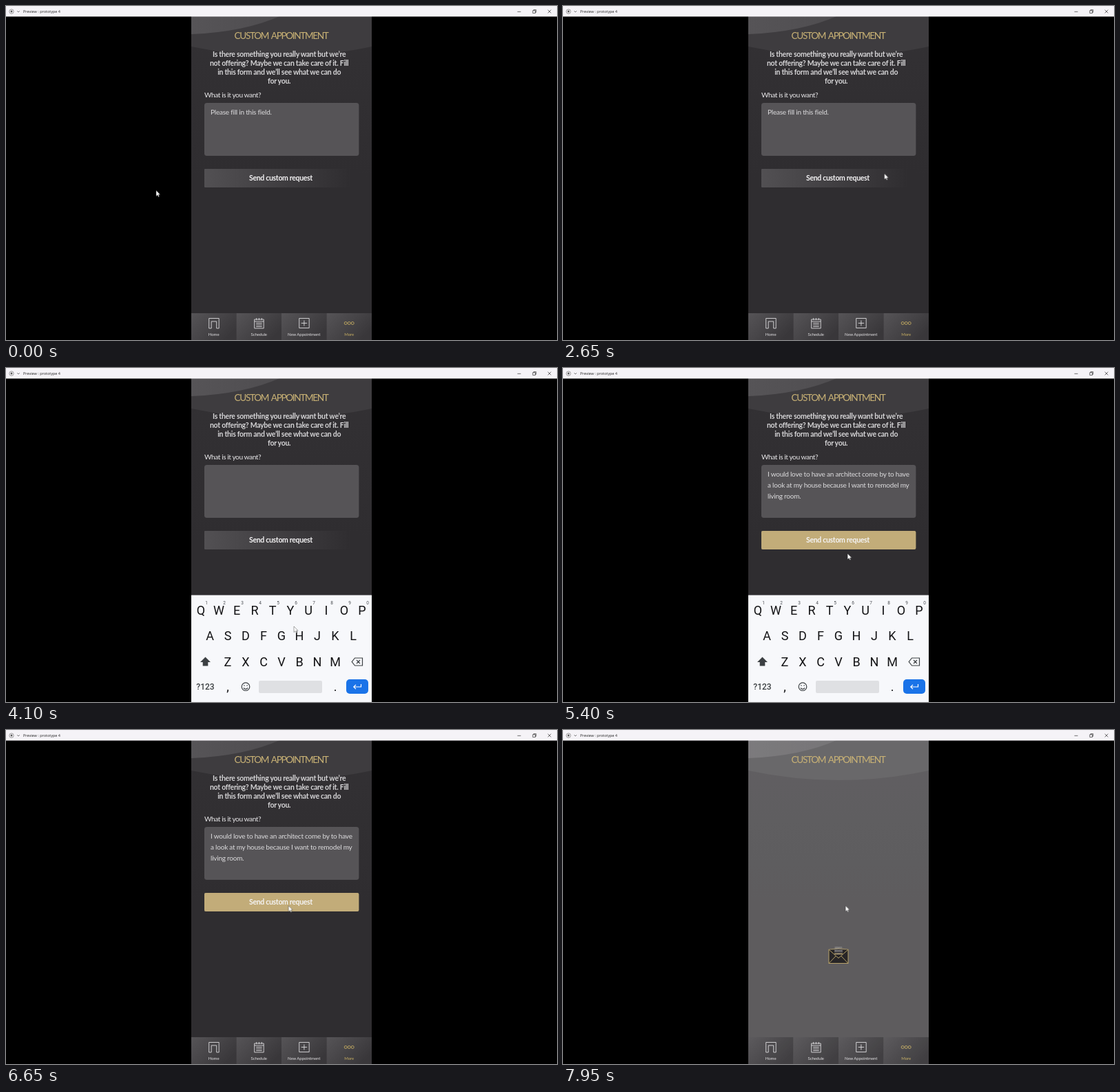
These frames come from a looping animation (800 px wide and 486 px high, 8000 ms). An HTML page:

```html
<!DOCTYPE html>
<html lang="en">
<head>
<meta charset="utf-8">
<title>Custom appointment</title>
<style>
  html, body { margin: 0; width: 100%; height: 100%; overflow: hidden; background: #000; }
  svg { display: block; width: 800px; height: 486px; }
  text { font-family: Lato, sans-serif; fill: #e9e8ea; white-space: pre; }
  .mid { text-anchor: middle; }
  .bar text { font: 5.5px "Open Sans", sans-serif; fill: #222; }
  .title { font-size: 13.6px; letter-spacing: -1.35px; word-spacing: 2.2px; fill: #c9b275; }
  .intro { font-size: 10.5px; font-weight: 700; letter-spacing: -.28px; fill: #d6d5d7; }
  .label { font-size: 10.2px; letter-spacing: -.45px; }
  .field { font-size: 10px; letter-spacing: -.22px; fill: #dddcde; }
  .send { font-size: 10.5px; font-weight: 700; letter-spacing: -.32px; fill: #f4f3f4; }
  .tab text { font-size: 6px; letter-spacing: -.06px; fill: currentColor; }
  .tab { color: #e4e3e5; fill: none; stroke: currentColor; stroke-width: .85; }
  .tab text, .keys text { stroke: none; }
  .keys text { font: 18px Roboto, sans-serif; fill: #121214; }
  .keys .digit { font-size: 6.5px; fill: #4c4f54; }
  .keys .small { font-size: 12px; font-weight: 500; fill: #3c4043; }
  .line { fill: none; stroke: #3c4043; stroke-width: 1.2; }
  #form { transform-origin: 400px 330px; }
  #flap { transform-origin: 400px 319.5px; }
  .envelope .edge { fill: none; vector-effect: non-scaling-stroke; stroke: #c4ad6e; stroke-width: .9; stroke-linejoin: round; }
</style>
</head>
<body>
<svg viewBox="0 0 800 486">
  <defs>
    <linearGradient id="page" x2="0" y2="1"><stop stop-color="#333134"/><stop offset=".5" stop-color="#2f2d30"/></linearGradient>
    <linearGradient id="tabFill" x2="1" y2=".6"><stop stop-color="#565457"/><stop offset="1" stop-color="#39373a"/></linearGradient>
    <linearGradient id="sendFill"><stop stop-color="#525053"/><stop offset=".95" stop-color="#2f2d30"/></linearGradient>
    <linearGradient id="wave"><stop stop-color="#565457"/><stop offset="1" stop-color="#4f4d50"/></linearGradient>
    <clipPath id="phone"><rect x="269" y="15" width="262" height="471"/></clipPath>
    <path id="arrow" d="M0 0V8.6L2 6.8 3.3 9.6 4.6 9 3.4 6.2H6Z" fill="#fff" stroke="#222" stroke-width=".4"/>
  </defs>

  <rect width="800" height="486"/>

  <g clip-path="url(#phone)">
    <rect x="269" y="15" width="262" height="471" fill="url(#page)"/>
    <path d="M269 15H531V59Q400 87 269 59Z" fill="#3e3c3f"/>
    <path d="M269 15H397Q345 38 269 41Z" fill="url(#wave)"/>
    <rect id="veil" x="269" y="15" width="262" height="471" fill="#fff" opacity="0"/>
    <text class="title mid" x="399.5" y="48">CUSTOM APPOINTMENT</text>

    <g id="envelope" class="envelope" opacity="0">
      <path id="body" d="M386 319.5V339.5H414V319.5Z" fill="#272527" fill-opacity="0"/>
      <path id="flap" class="edge" d="M386 319.5L400 308.5 414 319.5"/>
      <path class="edge" d="M386 319.5V339.5H414V319.5L400 332ZM386 339.5L396 329M414 339.5L404 329"/>
    </g>

    <g id="form">
      <g id="intro"></g>
      <text class="label" x="288" y="133">What is it you want?</text>
      <rect x="288" y="141" width="224.4" height="77" rx="3.5" fill="#565457"/>
      <text id="hint" class="field" x="297" y="158">Please fill in this field.</text>
      <rect x="288" y="237" width="224.4" height="27" rx="1" fill="url(#sendFill)"/>
      <g id="filled" opacity="0">
        <g id="request"></g>
        <rect x="288" y="237" width="224.4" height="27" rx="2" fill="#c2ac79"/>
      </g>
      <text class="send mid" x="399" y="254">Send custom request</text>
    </g>

    <g id="tabs"></g>
    <rect id="tabVeil" x="269" y="447" width="262" height="39" fill="#fff" opacity="0"/>

    <g id="keyboard" class="keys" opacity="0">
      <rect x="269" y="330.5" width="262" height="156" fill="#f7f8fb"/>
      <g id="letters"></g>
      <path d="M289.5 420.5L297 428H293.3V433.5H285.7V428H282Z" fill="#3c4043"/>
      <path class="line" d="M506.5 422H517.5V433H506.5L502.2 427.5ZM509 425l5 5M514 425l-5 5"/>
      <text class="small mid" x="289.5" y="468">?123</text>
      <text class="mid" x="322" y="470">,</text>
      <circle class="line" cx="348" cy="463.7" r="5.8"/>
      <path class="line" d="M345 465.5q3 3.6 6 0M345.9 461.3v1.4M350.1 461.3v1.4"/>
      <rect x="367" y="455" width="92" height="18" rx="2" fill="#dfe0e3"/>
      <text class="mid" x="478" y="470">.</text>
      <rect x="494" y="453" width="32" height="21" rx="5" fill="#1a73e8"/>
      <path class="line" style="stroke:#fff" d="M515.5 460v4H505M508 460.8l-3.2 3.2 3.2 3.2"/>
    </g>
  </g>

  <g class="bar">
    <rect width="800" height="15.4" fill="#f5f3f7"/>
    <circle cx="8" cy="8" r="3.2" fill="none" stroke="#777" stroke-width=".7"/>
    <circle cx="8" cy="8" r="1.4" fill="#555"/>
    <path d="M16.3 7.2l1.7 1.7 1.7-1.7M742.5 8.3h5M764.8 6.7h3.7v3.7h-3.7zM766 6.7v-1.2h3.7v3.7h-1.2M786.7 5.6l4.7 4.7M791.4 5.6l-4.7 4.7" fill="none" stroke="#333" stroke-width=".7"/>
    <text x="25" y="10">Preview : prototype 4</text>
  </g>

  <use id="idle" href="#arrow" transform="translate(218 268.3)"/>
  <use id="pointer" href="#arrow" opacity="0"/>
</svg>

<script>
  const LOOP = 8000;
  const el = id => document.getElementById(id);

  // Text blocks
  const lines = (id, cls, x, y, step, rows) => {
    el(id).innerHTML = rows.map((row, i) =>
      `<text class="${cls}" x="${x}" y="${y + i * step}">${row}</text>`).join("");
  };
  lines("intro", "intro mid", 396.7, 73.6, 13.2, [
    "Is there something you really want but we’re",
    "not offering? Maybe we can take care of it. Fill",
    "in this form and we’ll see what we can do",
    "for you."
  ]);
  lines("request", "field", 297, 158, 16, [
    "I would love to have an architect come by to have",
    "a look at my house because I want to remodel my",
    "living room."
  ]);

  // Bottom tabs: icons are drawn around the tab centre
  const ring = x => `M${x - 2} 0a2 2 0 1 0 4 0a2 2 0 1 0 -4 0`;
  const tabs = [
    ["Home", "M-7-7H7.5V7.5H4V-2.5H-3.5V7.5H-7Z"],
    ["Schedule", "M-6.5-5.5H7V7.5H-6.5ZM-6.5-2.5H7M-4 0H4.5M-4 2.5H4.5M-4 5H4.5M-3.5-7.5v3M.2-7.5v3M4-7.5v3"],
    ["New Appointment", "M-7-7H7.5V7H-7ZM.2-4V4M-4 0H4.4"],
    ["More", ring(-5) + ring(0) + ring(5)]
  ];
  el("tabs").innerHTML = tabs.map(([name, icon], i) => {
    const x = 269 + 65.5 * i, y = name.includes(" ") ? 480 : 479.5;
    return `<rect x="${x}" y="447" width="65.6" height="39" fill="url(#tabFill)"/>
      <g id="tab${i}" class="tab"><path transform="translate(${x + 32.7} 461.5)" d="${icon}"/>
      <text class="mid" x="${x + 32.7}" y="${y}">${name}</text></g>`;
  }).join("");

  // Keyboard letters
  const row = (chars, x, y, cls = "") => [...chars].map((c, i) =>
    `<text class="mid ${cls}" x="${x + 26 * i}" y="${y}">${c}</text>`).join("");
  el("letters").innerHTML = row("QWERTYUIOP", 283, 358.5) + row("1234567890", 291, 343.5, "digit")
    + row("ASDFGHJKL", 296, 396) + row("ZXCVBNM", 322, 434);

  // Steps are [time, value, easing]; the ends are held
  const play = (id, prop, steps, format = v => v) => {
    const all = [[0, steps[0][1]], ...steps, [LOOP, steps[steps.length - 1][1]]];
    el(id).animate(
      all.map(([t, v, easing = "linear"]) => ({ offset: t / LOOP, [prop]: format(v), easing })),
      { duration: LOOP, iterations: Infinity });
  };
  const at = ([x, y]) => `translate(${x}px, ${y}px)`;
  const WHITE = "#e4e3e5", GOLD = "#c9b062";

  play("idle", "opacity", [[750, 1], [1000, 0]]);
  play("pointer", "opacity", [[750, 0], [1000, 1]]);
  play("pointer", "transform", [
    [1600, [498, 291.3], "ease-in-out"], [2400, [478, 256], "ease-in-out"],
    [3250, [415, 188.7]], [3500, [415, 188.7], "ease-in-out"],
    [4150, [418, 378]], [5130, [418, 378], "ease-out"],
    [5400, [413.2, 270], "ease-out"], [5700, [410.2, 260]],
    [6300, [410.2, 259.7]], [6600, [410.2, 255.6]]
  ], at);

  play("keyboard", "opacity", [[3260, 0], [3570, 1], [6130, 1], [6440, 0]]);
  play("hint", "opacity", [[3260, 1], [3570, 0]]);
  play("filled", "opacity", [[4610, 0], [4900, 1]]);
  play("tab0", "color", [[3260, WHITE], [3570, GOLD], [6000, GOLD], [6050, WHITE]]);
  play("tab3", "color", [[3260, GOLD], [3570, WHITE], [6300, WHITE], [6440, GOLD]]);

  play("form", "transform", [[7527, 1], [7975, 0]], s => `scale(${s})`);
  play("envelope", "opacity", [[7527, 0], [7650, .35], [7850, 1]]);
  play("body", "fillOpacity", [[7650, 0], [7900, 1]]);
  play("flap", "transform", [[7680, 1], [7950, .15]], s => `scaleY(${s})`);
  play("veil", "opacity", [[7640, 0], [7950, .225]]);
  play("tabVeil", "opacity", [[7640, 0], [7950, .04]]);
</script>
</body>
</html>
```
